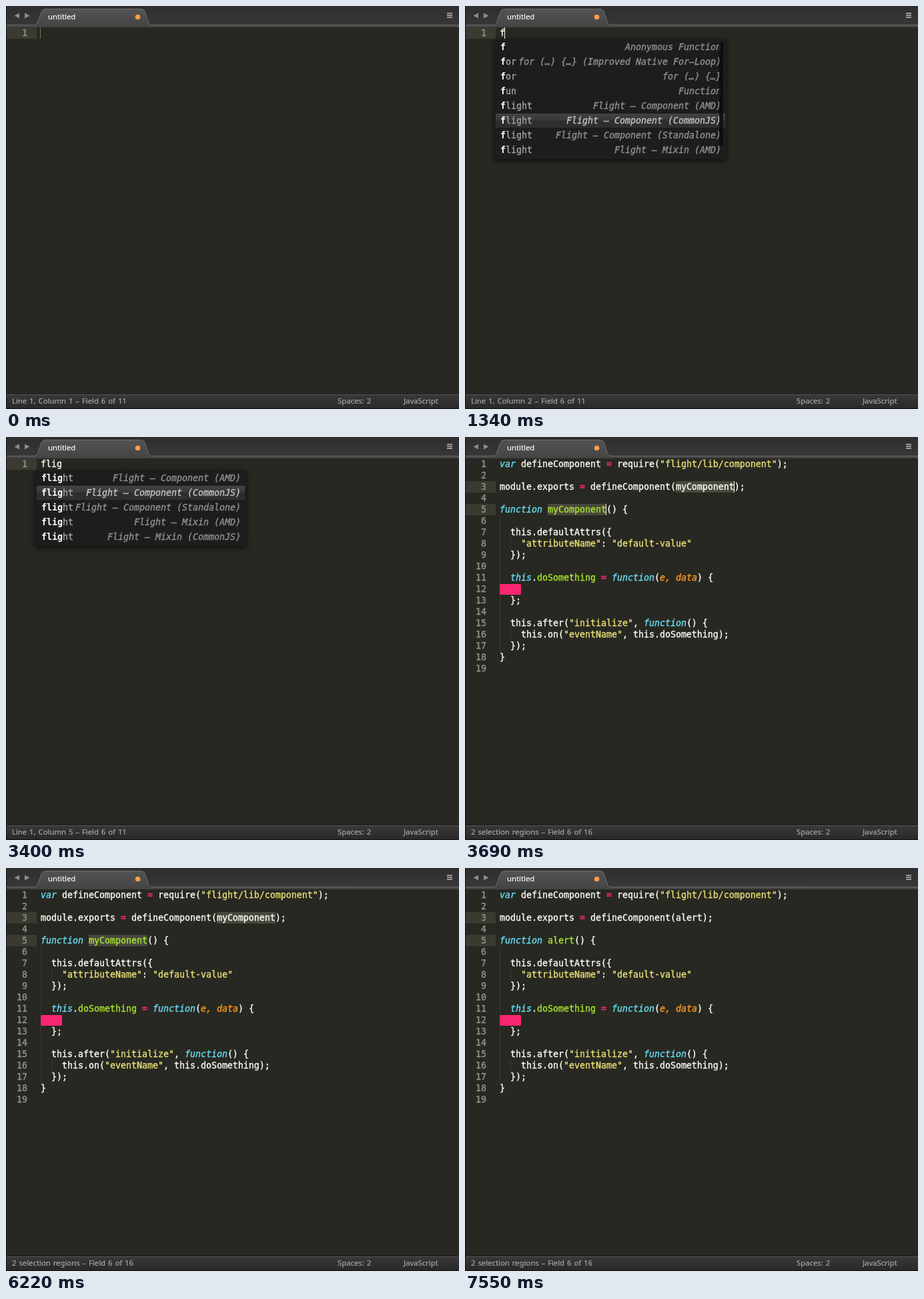
An HTML page for the animation above (7.99 s loop, 679 px wide and 603 px high).

```html
<!DOCTYPE html>
<html lang="en">
<head>
<meta charset="utf-8">
<title>Snippet completion</title>
<style>
html, body { margin: 0; width: 100%; height: 100%; overflow: hidden; background: #272822; }
#stage { position: relative; width: 679px; height: 603px; overflow: hidden; background: #272822; }
#stage div, svg, pre { position: absolute; margin: 0; }
svg { left: 0; top: 0; }
pre, .popup { font: 13.29px/17px "DejaVu Sans Mono", monospace; color: #f8f8f2; white-space: pre; -webkit-text-stroke: .4px; }
pre { top: 32px; }
.ui { font: 11.3px/16px "Noto Sans", sans-serif; word-spacing: 1px; color: #a6a6a6; white-space: pre; -webkit-text-stroke: .2px; }
#numbers { left: 1px; width: 31px; text-align: right; color: #8f908a; }
#code { left: 52px; }
.kw { color: #66d9ef; }
.arg { color: #fd971f; }
.op, .str, .name { font-style: normal; }
.op { color: #f92672; }
.str { color: #e6db74; }
.name { color: #a6e22e; }
.active { left: 1px; width: 45px; height: 17px; background: #3b3a31; }
.selection { height: 17px; background: #49483e; }
.caret { width: 1px; height: 17px; background: #f8f8f0; }
.guide { width: 1px; background: repeating-linear-gradient(#4b4c44 0 1px, transparent 1px 2px); }
.blank { left: 52px; top: 220px; width: 32px; height: 16px; border-radius: 2px; background: #f92672; }
.popup { background: #1d1d1d; box-shadow: 0 0 0 2px #1d1d1d, 0 3px 7px 3px #0008; border-radius: 2px; color: #a0a0a0; }
.row { width: 100%; height: 22px; line-height: 22px; }
.row b { color: #fff; -webkit-text-stroke: 0; }
.row span { position: absolute; left: 7px; }
.row i { position: absolute; right: 6px; color: #8e8e8e; }
.row.on { height: 21px; background: linear-gradient(#434343, #373737 48%, #2c2c2c 52%, #303030); }
.row.on i { color: #c0c0c0; }
.bar { right: 3px; top: 3px; width: 6px; height: 155px; border-radius: 3px; background: #0b0b0bcc; }
</style>
</head>
<body>
<div id="stage">
  <div id="marks"></div>
  <pre id="numbers"></pre>
  <pre id="code"></pre>
  <div id="overlay"></div>
  <svg width="679" height="603">
    <defs>
      <linearGradient id="header" x2="0" y2="1"><stop stop-color="#2e2e2e"/><stop offset="1" stop-color="#373737"/></linearGradient>
      <linearGradient id="tab" x2="0" y2="1"><stop stop-color="#535353"/><stop offset="1" stop-color="#444"/></linearGradient>
      <linearGradient id="footer" x2="0" y2="1"><stop stop-color="#383838"/><stop offset="1" stop-color="#292929"/></linearGradient>
    </defs>
    <path fill="url(#header)" d="M0 0H679V28H0Z"/>
    <path fill="#444" d="M0 28H679V31H0Z"/>
    <path fill="#1f201b" d="M0 31H679V32H0Z"/>
    <path fill="url(#tab)" stroke="#6c6c6c" d="M0 28.5H42C46 28.5 47 26 48 23L53 9Q55 4.5 59 4.5H202Q207 4.5 208.5 9L213 23C214 26 215 28.5 219 28.5H679V32H0Z" style="clip-path:inset(0 0 1px 0)"/>
    <path fill="#8c8c8c" d="M20 10.5V18.5L12.5 14.5ZM28 10.5V18.5L35.5 14.5Z"/>
    <path stroke="#999" stroke-width="2" d="M661 11h8M661 14h8M661 17h8"/>
    <circle cx="197.5" cy="16.5" r="3.8" fill="#ff9d48"/>
    <path fill="url(#footer)" d="M0 582H679V602H0Z"/>
    <path fill="#1c1c1c" d="M0 580H679V581H0Z"/>
    <path fill="#555" d="M0 581H679V582H0Z"/>
    <path fill="#111" d="M0 0H1V602H679V603H0Z"/>
  </svg>
  <div class="ui" style="left:63px;top:8px;color:#f8f8f8">untitled</div>
  <div class="ui" id="status" style="left:9px;top:583px"></div>
  <div class="ui" style="left:497px;top:583px">Spaces: 2</div>
  <div class="ui" style="left:596px;top:583px">JavaScript</div>
</div>
<script>
const LOOP = 7990, COL = 8, LINE = 17, DIM = 0.35;
const $ = id => document.getElementById(id);
const colX = col => 52 + COL * col;
const lineY = line => 32 + LINE * (line - 1);

// [start ms, caret opacity, typed text]; a missing text keeps the previous one
const steps = [
  [0, DIM, ''], [150, 0], [600, DIM], [750, 1], [1040, DIM], [1190, 0],
  [1340, 1, 'f'], [1490, 1, 'fl'], [1780, 1, 'fli'], [1930, 1, 'flig'],
  [2220, DIM], [2370, 0], [2960, 1], [3250, DIM], [3400, 0],
  [3690, 1, 'myComponent'], [3990, DIM], [4140, 0], [4580, DIM], [4730, 1],
  [5030, DIM], [5180, 0], [5620, DIM], [5770, 1], [6070, DIM], [6220, 0],
  [6510, 1, 'a'], [6660, 1, 'al'], [6800, 1, 'aler'], [6950, 1, 'alert'],
  [7400, DIM], [7550, 0]
];
steps.forEach((step, i) => step[2] ??= steps[i - 1][2]);
const EXPANDED = 3690;

const flight = ['Component (AMD)', 'Component (CommonJS)', 'Component (Standalone)', 'Mixin (AMD)', 'Mixin (CommonJS)']
  .map(kind => ['flight', 'Flight – ' + kind]);
const allF = [
  ['f', 'Anonymous Function'], ['for', 'for (…) {…} (Improved Native For–Loop)'],
  ['for', 'for (…) {…}'], ['fun', 'Function'], ...flight.slice(0, 4)
];
const allA = [
  ['after', 'Flight – Advice (After)'], ['around', 'Flight – Advice (Around)'],
  ['attributeName', ''], ['after', ''], ['alert', ''], ['arguments', '']
];

const tag = cls => text => `<i class="${cls}">${text}</i>`;
const [kw, arg, op, str, name] = ['kw', 'arg', 'op', 'str', 'name'].map(tag);

const source = component => `${kw('var')} defineComponent ${op('=')} require(${str('"flight/lib/component"')});

module.exports ${op('=')} defineComponent(${component});

${kw('function')} ${name(component)}() {

  this.defaultAttrs({
    ${str('"attributeName"')}: ${str('"default-value"')}
  });

  ${kw('this')}.${name('doSomething')} ${op('=')} ${kw('function')}(${arg('e, data')}) {

  };

  this.after(${str('"initialize"')}, ${kw('function')}() {
    this.on(${str('"eventName"')}, this.doSomething);
  });
}
`;

const box = (cls, x, y, style = '') => `<div class="${cls}" style="left:${x}px;top:${y}px;${style}"></div>`;
const guide = (col, from, to) => box('guide', colX(col), lineY(from), `height:${LINE * (to - from)}px`);

function popup(x, y, width, typed, rows, selected, scrollbar = '') {
  const items = rows.map(([label, hint], i) =>
    `<div class="row ${i === selected ? 'on' : ''}" style="top:${22 * i}px">` +
    `<span><b>${typed}</b>${label.slice(typed.length)}</span><i>${hint}</i></div>`).join('');
  return `<div class="popup" style="left:${x}px;top:${y}px;width:${width}px;height:${22 * rows.length}px">${items}${scrollbar}</div>`;
}

function completions(text) {
  if (text === 'f') return popup(46, 51, 344, text, allF, 5, '<div class="bar"></div>');
  if (text === 'a') return popup(310, 85, 300, text, allA, 0);
  return text.startsWith('fl') ? popup(46, 51, 312, text, flight, 1) : '';
}

function render([start, opacity, text]) {
  const expanded = start >= EXPANDED;
  const places = expanded ? [[33, 3], [9, 5]] : [[0, 1]];
  let marks = places.map(([, line]) => box('active', 1, lineY(line))).join('');
  if (expanded) marks += guide(0, 6, 18) + guide(2, 8, 9) + guide(2, 16, 17) + '<div class="blank"></div>';
  if (text === 'myComponent')
    marks += places.map(([col, line]) => box('selection', colX(col), lineY(line), `width:${COL * text.length}px`)).join('');
  $('marks').innerHTML = marks;
  $('numbers').textContent = Array.from({ length: expanded ? 19 : 1 }, (_, i) => i + 1).join('\n');
  $('code').innerHTML = expanded ? source(text) : text;
  $('overlay').innerHTML = completions(text) + places.map(([col, line]) =>
    box('caret', colX(col + text.length) - 1, lineY(line), `opacity:${opacity}`)).join('');
  $('status').textContent = expanded
    ? '2 selection regions – Field 6 of 16'
    : `Line 1, Column ${text.length + 1} – Field 6 of 11`;
}

let shown;
function tick() {
  const time = performance.now() % LOOP;
  const step = steps.findLast(([start]) => start <= time);
  if (step !== shown) render(shown = step);
  requestAnimationFrame(tick);
}
tick();
</script>
</body>
</html>
```
